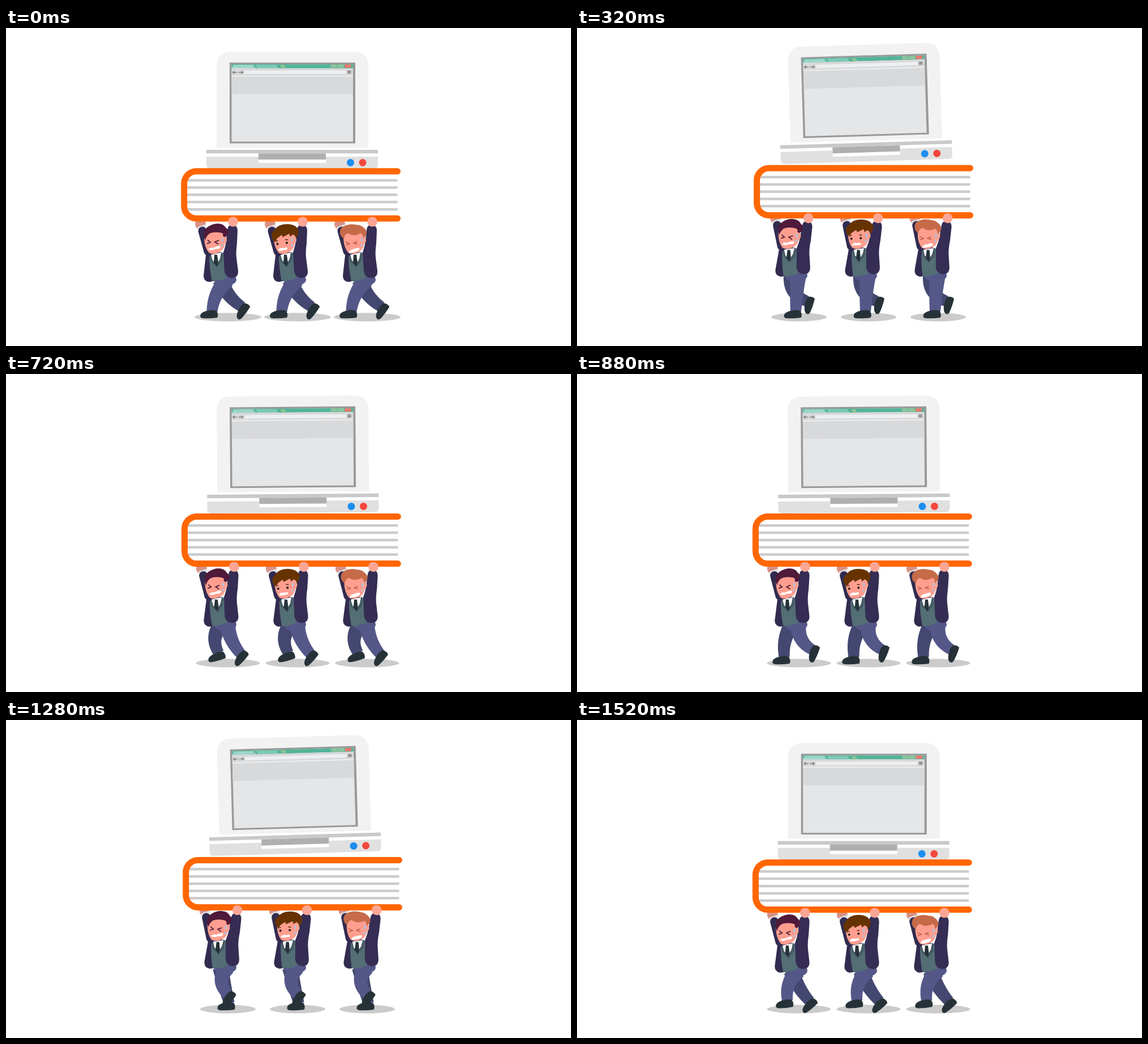
These frames come from a looping animation (998 px wide and 561 px high, 1.6 s). An HTML page:

```html
<!DOCTYPE html>
<html lang="en">
<head>
<meta charset="utf-8">
<title>Heavy load</title>
<style>
html, body { margin: 0; width: 100%; height: 100%; overflow: hidden; background: #fff; }
svg { display: block; width: 100%; height: 100%; }
</style>
</head>
<body>
<svg viewBox="0 0 998 561">
  <defs>
    <ellipse id="shadow" cx="392" cy="510" rx="59" ry="7.5" fill="#cbcbcb"/>
    <path id="shoe" fill="#263238" d="M-21 8Q-21 2 -10 -1Q0 -4 8 -1Q12 6 9 11Q-5 13 -17 12Q-21 11 -21 8Z"/>
    <g id="legs">
      <path id="farLeg" fill="#444870"/>
      <use id="farShoe" href="#shoe"/>
      <path id="nearLeg" fill="#545788"/>
      <use id="nearShoe" href="#shoe"/>
      <ellipse id="hips" cx="387" cy="444" rx="20" ry="11" fill="#545788"/>
    </g>
    <g id="farHand">
      <circle cx="343.500" cy="346" r="9.500" fill="#d99184"/>
      <path d="M339 354L353 349" stroke="#dfe3e6" stroke-width="6"/>
    </g>
    <g id="torso">
      <path d="M347 358L357 394" stroke="#322b50" stroke-width="15" stroke-linecap="round"/>
      <path fill="#322b50" d="M354 392L349 437Q349 447 359 448L376 445L382 396Z"/>
      <path fill="#546e75" d="M359 403L385 396L391 440Q378 447 364 447Q359 424 359 403Z"/>
      <path fill="#455a64" d="M360 402L383 397L382 411L373 422L362 412Z"/>
      <path fill="#fff" d="M362 400L380 396L378 407L372 418L365 410Z"/>
      <path fill="#263238" d="M368 400L373 400L375 414L373 421L367 414Z"/>
      <path fill="#352d54" d="M391 356Q392 347 400 347Q409 348 409 357L408 380Q406 395 407 405L410 428Q411 441 398 441Q388 440 386 430L384 396Q388 385 389 374Z"/>
      <circle cx="401" cy="341.800" r="8.800" fill="#fba695"/>
    </g>
    <g id="face">
      <ellipse cx="385" cy="374" rx="5" ry="6.500" fill="#ffa596"/>
      <path fill="#ff9e8f" d="M350 372Q350 352 369 350Q387 351 387 372Q388 388 379 394Q368 401 359 397Q351 388 350 372Z"/>
    </g>
    <g id="sweat" fill="#a9c4e4">
      <path d="M382 369Q386 374 383 377Q379 376 382 369Z"/>
      <path d="M382 380Q385 384 382 386Q379 385 382 380Z"/>
    </g>
  </defs>
  <g id="shadows"></g>
  <g id="farHands"></g>
  <g id="laptop">
    <path fill="#f2f2f2" d="M372 211V68Q372 42 398 42H614Q640 42 640 68V211Z"/>
    <path fill="#999" d="M395 61H617V203.500H395Z"/>
    <path fill="#e5e6e8" d="M398.500 64H613V200.500H398.500Z"/>
    <path fill="#53b498" d="M398.500 64H613V71H398.500Z"/>
    <path fill="#9dd6ca" d="M398.500 71L402 65H437L441 71Z"/>
    <path fill="#7bcab6" d="M444 71L441 65H478L482 71Z"/>
    <path fill="#96c493" d="M484 65.500H491L495 70H487Z"/>
    <path stroke="#5b958a" stroke-width=".7" d="M436.500 67L438.500 69M438.500 67L436.500 69M478.500 67L480.500 69M480.500 67L478.500 69"/>
    <path fill="#90c39b" d="M573.500 64.500H584.500V70H575Q573.500 70 573.500 68ZM585.500 64.500H597V70H585.500Z"/>
    <path fill="#ee786c" d="M598 64.500H609.500V68Q609.500 70 608 70H598Z"/>
    <path fill="#d8d9da" d="M398.500 71H613V84H398.500ZM398.500 86H613V117H398.500Z"/>
    <path fill="#eeeff0" d="M421.500 75H600.500V81H421.500ZM398.500 84H613V85.500H398.500Z"/>
    <path fill="none" stroke="#777" stroke-width="1.200" d="M408 78.300H400.500M403.500 76L400.500 78.300L403.500 80.600M410.500 78.300H418.500M415.500 76L418.500 78.300L415.500 80.600"/>
    <path stroke="#777" stroke-width="1.300" d="M603 75.800H609.500M603 77.700H609.500M603 79.600H609.500"/>
    <path fill="#c9c9c9" d="M354 215H657V221.300H354Z"/>
    <path fill="#e0e0e0" d="M354 227H657V241Q657 248 650 248H361Q354 248 354 241Z"/>
    <path fill="#fff" d="M446 227H565V238H446Z"/>
    <path fill="#afafaf" d="M446 221.300H565V232H446Z"/>
    <circle cx="608.500" cy="237.500" r="6.500" fill="#1c8ef0"/>
    <circle cx="630" cy="237.500" r="6.500" fill="#f4473c"/>
  </g>
  <g id="book" fill="none">
    <path fill="#fff" d="M320 253H691V336H320Z"/>
    <path id="pages" stroke="#cbcbcb" stroke-width="4.500"/>
    <path stroke="#f60" stroke-width="11" stroke-linecap="round" d="M691.500 252.800H336.200A21.500 21.500 0 0 0 314.700 274.300V314.500A21.500 21.500 0 0 0 336.200 336H691.500"/>
  </g>
  <g id="people"></g>
</svg>
<script>
const $ = id => document.getElementById(id);
const LOOP = 1600, STEP = 80, GAP = 123;

const faces = [
  `<path fill="#501a3a" d="M352 375Q345 360 356 351Q365 345 374 345Q384 345 388 352Q395 357 391 366L387 369L383 367Q385 362 379 361Q366 359 359 363Q353 368 352 375Z"/>
   <path fill="none" stroke="#4a1733" stroke-width="1.700" d="M356 374L361 378L355 380.500M376 374.500L369 377.500L375 381.500"/>
   <path fill="#fff" d="M357 390Q361 387 367 387.500Q374 384 378 384Q380 387 376 389.500Q370 389 366 391.500Q360 393 357 390Z"/>`,
  `<path fill="#663300" d="M350 376Q342 364 350 358Q357 345 376 346Q390 347 394 357L393 364L389 372Q389 367 384 364L379 368L377 363L366 369L364 365L356 371L354 375Z"/>
   <path fill="none" stroke="#4a2608" stroke-width="1.400" d="M351.500 377L357 375M370 373.500L375 373.500"/>
   <circle cx="356.500" cy="381" r="2" fill="#2c1a12"/>
   <circle cx="373" cy="379" r="2" fill="#2c1a12"/>
   <path fill="#fff" d="M358 391Q361 387 368 388L373 387Q375 389 373 391Q364 393 359 393Z"/>`,
  `<path fill="#c66b49" d="M351 372Q340 364 346 353Q356 344 372 347Q385 347 391 359Q391 367 388 368L385 371Q385 363 380 362Q370 369 358 362Q352 364 351 372Z"/>
   <path fill="none" stroke="#b5573f" stroke-width="1.400" d="M354 377.500L361 380.500L355 383M374 376.500L368 379.500L375 381.500"/>
   <path fill="#fff" d="M360 395Q362 391 368 390Q375 387 378 388Q379 392 374 394Q368 396 361 397Z"/>`
];

const each = make => faces.map((f, i) => `<g transform="translate(${i * GAP})">${make(f)}</g>`).join("");
$("shadows").innerHTML = each(() => '<use href="#shadow"/>');
$("farHands").innerHTML = each(() => '<g class="lean"><use href="#farHand"/></g>');
$("people").innerHTML = each(f => `<use href="#legs"/><g class="lean"><use href="#torso"/><use href="#face"/>${f}<use href="#sweat"/></g>`);
const leaning = document.querySelectorAll(".lean");

let pages = "";
for (let i = 0; i < 5; i++) pages += `M319 ${268.7 + 12.8 * i}H691.5`;
$("pages").setAttribute("d", pages);

// Half a sine wave between a and b, zero elsewhere
const bump = (p, a, b) => p > a && p < b ? Math.sin(Math.PI * (p - a) / (b - a)) : 0;

// Phase 0 plants the shoe in front; it slides back, lifts off and swings forward
function gait(p) {
  const slide = p < 0.5 ? Math.min(1, p / 0.47) : 1 - (2 * p - 1) ** 1.5;
  return {
    x: 364 + 53 * slide,
    y: 500 - 18 * bump(p, 0.38, 1),
    angle: -70 * bump(p, 0.3, 0.96),
    bend: 12 - 11 * Math.sin(2 * Math.PI * p)
  };
}

// Tapered limb along a quadratic curve
function limb(x0, y0, x1, y1, x2, y2) {
  const left = [], right = [], n = 12;
  for (let i = 0; i <= n; i++) {
    const s = i / n, r = 1 - s;
    const x = r * r * x0 + 2 * r * s * x1 + s * s * x2;
    const y = r * r * y0 + 2 * r * s * y1 + s * s * y2;
    const dx = r * (x1 - x0) + s * (x2 - x1), dy = r * (y1 - y0) + s * (y2 - y1);
    const w = (14 - 4.5 * s) / Math.hypot(dx, dy);
    left.push([x - dy * w, y + dx * w]);
    right.unshift([x + dy * w, y - dx * w]);
  }
  return "M" + left.concat(right).map(p => p.map(v => v.toFixed(2))).join("L") + "Z";
}

function drawLeg(name, phase, hipX, hipY) {
  const { x, y, angle, bend } = gait(phase % 1);
  const dx = x - hipX, dy = y - hipY, out = bend / Math.hypot(dx, dy);
  const kneeX = (hipX + x) / 2 - dy * out, kneeY = (hipY + y) / 2 + dx * out;
  $(name + "Leg").setAttribute("d", limb(hipX, hipY, kneeX, kneeY, x, y));
  $(name + "Shoe").setAttribute("transform", `translate(${x} ${y}) rotate(${angle})`);
}

function draw(t) {
  const k = 5 - Math.abs(t % 800 - 400) / 80;
  const dx = 0.75 * k, dy = -1.4 * k, sink = -1.9 * k;
  // The laptop settles a little sooner at the end of the loop
  const hop = t < 1200 ? k / 4 : Math.max(0, 1.27 * (1520 - t) / 320);

  $("shadow").setAttribute("rx", 59 - 2.5 * k);
  $("book").setAttribute("transform", `translate(${dx} ${dy})`);
  $("laptop").setAttribute("transform", `translate(${dx} ${dy - 7 * hop}) rotate(${-1.7 * hop} 506 145)`);
  for (const g of leaning)
    g.setAttribute("transform", `translate(${0.2 * k} ${-1.85 * k}) rotate(${0.95 * k} 388 445)`);

  $("hips").setAttribute("transform", `translate(0 ${sink})`);
  drawLeg("far", t / LOOP + 0.47, 379, 445 + sink);
  drawLeg("near", t / LOOP, 391, 444 + sink);
}

const start = performance.now();
function tick() {
  const t = (performance.now() - start) % LOOP;
  draw(Math.floor(t / STEP) * STEP);
  requestAnimationFrame(tick);
}
tick();
</script>
</body>
</html>
```
